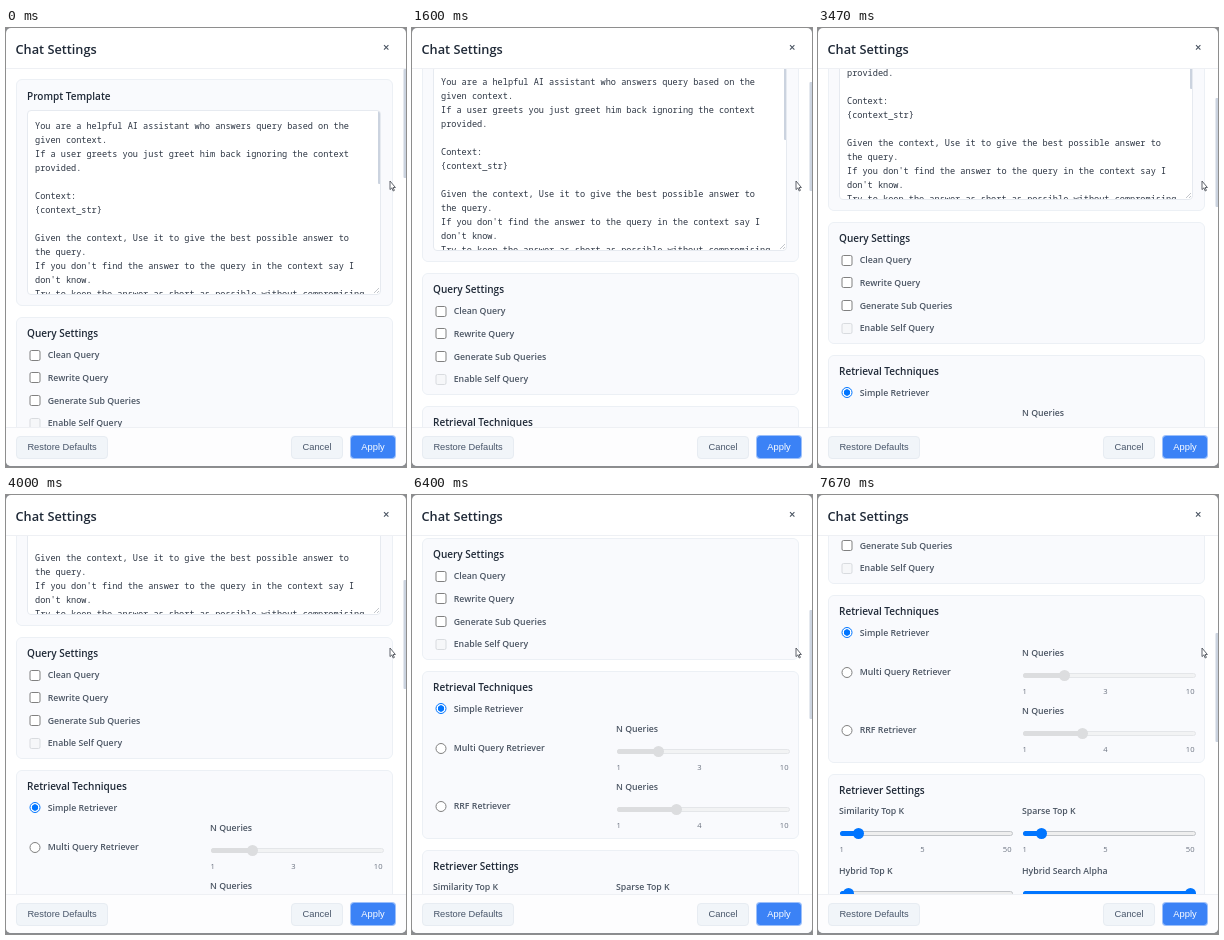
Animation of 400 by 439 pixels, one loop 8 s. Source, as an HTML page:

```html
<!DOCTYPE html>
<html lang="en">
<head>
<meta charset="utf-8">
<title>Chat Settings</title>
<style>
@property --s { syntax: "<integer>"; inherits: true; initial-value: 0; }

html, body { margin: 0; width: 100%; height: 100%; overflow: hidden; background: #8a8c90; }
body { font: 600 8.75px "Open Sans", "Noto Sans", sans-serif; color: #4b5563; }
div, span, svg, pre { position: absolute; box-sizing: border-box; margin: 0; }

.modal {
  left: 0; top: 0; width: 400px; height: 438px; overflow: hidden;
  background: #fff; border-radius: 5px;
  animation: scroll 8s infinite;
}
/* Each scroll burst advances in 15 fps steps */
@keyframes scroll {
  0% { --s: 0; animation-timing-function: step-end; }
  11.57% { --s: 0; animation-timing-function: steps(7, start); }
  17.4% { --s: 44; animation-timing-function: step-end; }
  27.4% { --s: 44; animation-timing-function: steps(7, start); }
  33.23% { --s: 88; animation-timing-function: step-end; }
  43.23% { --s: 88; animation-timing-function: steps(9, start); }
  50.73% { --s: 147; animation-timing-function: step-end; }
  59.07% { --s: 147; animation-timing-function: steps(7, start); }
  64.9% { --s: 191; animation-timing-function: step-end; }
  74.07% { --s: 191; animation-timing-function: steps(8, start); }
  80.73% { --s: 246; animation-timing-function: step-end; }
  87.4% { --s: 246; animation-timing-function: steps(11, start); }
  96.57%, 100% { --s: 322; }
}

.view { left: 0; top: 41px; width: 400px; height: 358px; overflow: hidden; }
.page { left: 0; top: calc(-41px - var(--s) * 1px); width: 400px; height: 800px; }
.bar {
  left: 397px; top: calc(41px + var(--s) * .3px); width: 3px; height: 109px;
  background: #cbd3df; border-radius: 1px; transform: translateX(.5px);
}

.text { line-height: 20px; white-space: pre; }
.title { font-size: 12.75px; color: #1f2937; }
.head { font-size: 10.03px; color: #1f2937; }
.tick { font-size: 7.6px; font-weight: 400; color: #6b7280; }
.tick.mid { transform: translateX(-50%); }
.tick.end { transform: translateX(-100%); }

.card { left: 10px; width: 377px; background: #f9fafd; border: 1px solid #ecf0f5; border-radius: 6px; }
.area {
  left: 21px; top: 82px; width: 354px; height: 185px; overflow: hidden;
  background: #fff; border: 1px solid #e6eaf0; border-radius: 4px;
}
.area pre {
  left: 7px; top: 8px; color: #2b3442;
  font: 400 8.58px/14px "Noto Sans Mono", "DejaVu Sans Mono", monospace;
}
.area div { left: 350px; top: 0; width: 3px; height: 73px; background: #cbd3df; border-radius: 1px; }
.area svg { right: 0; bottom: 0; }

.check, .radio { left: 23px; width: 11px; height: 11px; background: #fff; border: 1px solid #808080; transform: translateX(.5px); }
.check { border-radius: 2px; }
.check.off { background: #f6f7f9; border-color: #d8dbdf; }
.radio { border-radius: 50%; }
.radio.on { border-color: #0075ff; background: radial-gradient(#0075ff 2.9px, #fff 3.5px); }

.range { --fill: #0075ff; --line: #c2c5c9; --track: #efefef; width: 173px; height: 11px; }
.range.off { --fill: #dcdddf; --line: #e4e6e9; --track: #f2f3f4; }
.track { left: 0; top: 3px; width: 173px; height: 5px; background: var(--track); border: 1px solid var(--line); border-radius: 3px; }
.fill { left: 0; top: 3px; height: 5px; background: var(--fill); border-radius: 3px; }
.knob { top: 0; width: 11px; height: 11px; background: var(--fill); border-radius: 50%; }

.rule { left: 0; width: 400px; height: 1px; background: #eef0f4; }
.foot { left: 0; top: 399px; width: 400px; height: 39px; background: #fdfdfe; border-top: 1px solid #eef0f4; }
.button {
  top: 408px; height: 23px; line-height: 21px; text-align: center;
  font-family: "Liberation Sans", Arial, sans-serif; font-size: 9.3px; font-weight: 400;
  color: #475569; background: #f1f5f9; border: 1px solid #e7ecf2; border-radius: 4px;
}
.button.main {
  top: 407px; height: 24px; line-height: 22px; color: #fff;
  background: #3b82f6 padding-box; border-color: #3b82f680;
}
</style>
</head>
<body>
<div class="modal">
  <div class="view"><div class="page" id="page">
    <div class="card" style="top:51px;height:227px"></div>
    <div class="card" style="top:289px;height:122px"></div>
    <div class="card" style="top:422px;height:168px"></div>
    <div class="card" style="top:601px;height:190px"></div>
    <div class="area">
<pre>You are a helpful AI assistant who answers query based on the
given context.
If a user greets you just greet him back ignoring the context
provided.

Context:
{context_str}

Given the context, Use it to give the best possible answer to
the query.
If you don't find the answer to the query in the context say I
don't know.
Try to keep the answer as short as possible without compromising</pre>
      <div></div>
      <svg width="6" height="6" stroke="#a9aeb5" stroke-width=".7"><path d="M0 5L5 0M3 5L5 3"/></svg>
    </div>
  </div></div>
  <div class="bar"></div>

  <div class="rule" style="top:40px"></div>
  <span class="text title" style="left:9.5px;top:11px">Chat Settings</span>
  <svg style="left:376px;top:15px" width="9" height="9" stroke="#4b5563" stroke-width="1.1"><path d="M2 2.2L6.4 6.6M6.4 2.2L2 6.6"/></svg>

  <div class="foot"></div>
  <div class="button" style="left:10px;width:92px">Restore Defaults</div>
  <div class="button" style="left:285px;width:52px">Cancel</div>
  <div class="button main" style="left:344px;width:46px">Apply</div>

  <svg style="left:383px;top:152px" width="8" height="13" fill="#fff" stroke="#50545c" stroke-width=".9" stroke-linejoin="round">
    <path d="M1 1V9.6L2.9 7.9L4.2 11L5.4 10.4L4.1 7.5H6.4Z"/>
  </svg>
</div>

<script>
const page = document.getElementById("page");

function add(parent, cls, style, text = "") {
  const el = document.createElement("div");
  el.className = cls;
  for (const key in style) el.style[key] = style[key] + "px";
  el.textContent = text;
  return parent.appendChild(el);
}

// y is the vertical centre in every helper
const label = (x, y, text, cls = "") => add(page, "text " + cls, { left: x, top: y - 10 }, text);

function option(kind, y, text, state = "") {
  add(page, `${kind} ${state}`, { top: y - 5.5 });
  label(41.7, y, text);
}

function slider(x, y, name, knob, ticks, state = "") {
  label(x - 1, y - 22, name);
  const range = add(page, "range " + state, { left: x, top: y - 5.5 });
  add(range, "track", {});
  add(range, "fill", { width: knob });
  add(range, "knob", { left: knob - 5.5 });
  if (!ticks) return;
  label(x - .5, y + 16, ticks[0], "tick");
  label(x + 82.5, y + 16, ticks[1], "tick mid");
  label(x + 171.5, y + 16, ticks[2], "tick end");
}

label(21, 68, "Prompt Template", "head");
label(21, 305, "Query Settings", "head");
label(21, 438, "Retrieval Techniques", "head");
label(21, 617, "Retriever Settings", "head");

const checks = ["Clean Query", "Rewrite Query", "Generate Sub Queries", "Enable Self Query"];
checks.forEach((text, i) => option("check", 327.2 + 22.7 * i, text, i === 3 ? "off" : ""));

option("radio", 459.7, "Simple Retriever", "on");
option("radio", 499.2, "Multi Query Retriever");
option("radio", 557, "RRF Retriever");
slider(205, 502, "N Queries", 41, [1, 3, 10], "off");
slider(205, 560, "N Queries", 59, [1, 4, 10], "off");

slider(22, 660, "Similarity Top K", 18, [1, 5, 50]);
slider(205, 660, "Sparse Top K", 18, [1, 5, 50]);
slider(22, 720, "Hybrid Top K", 8.5);
slider(205, 720, "Hybrid Search Alpha", 167);
</script>
</body>
</html>
```
